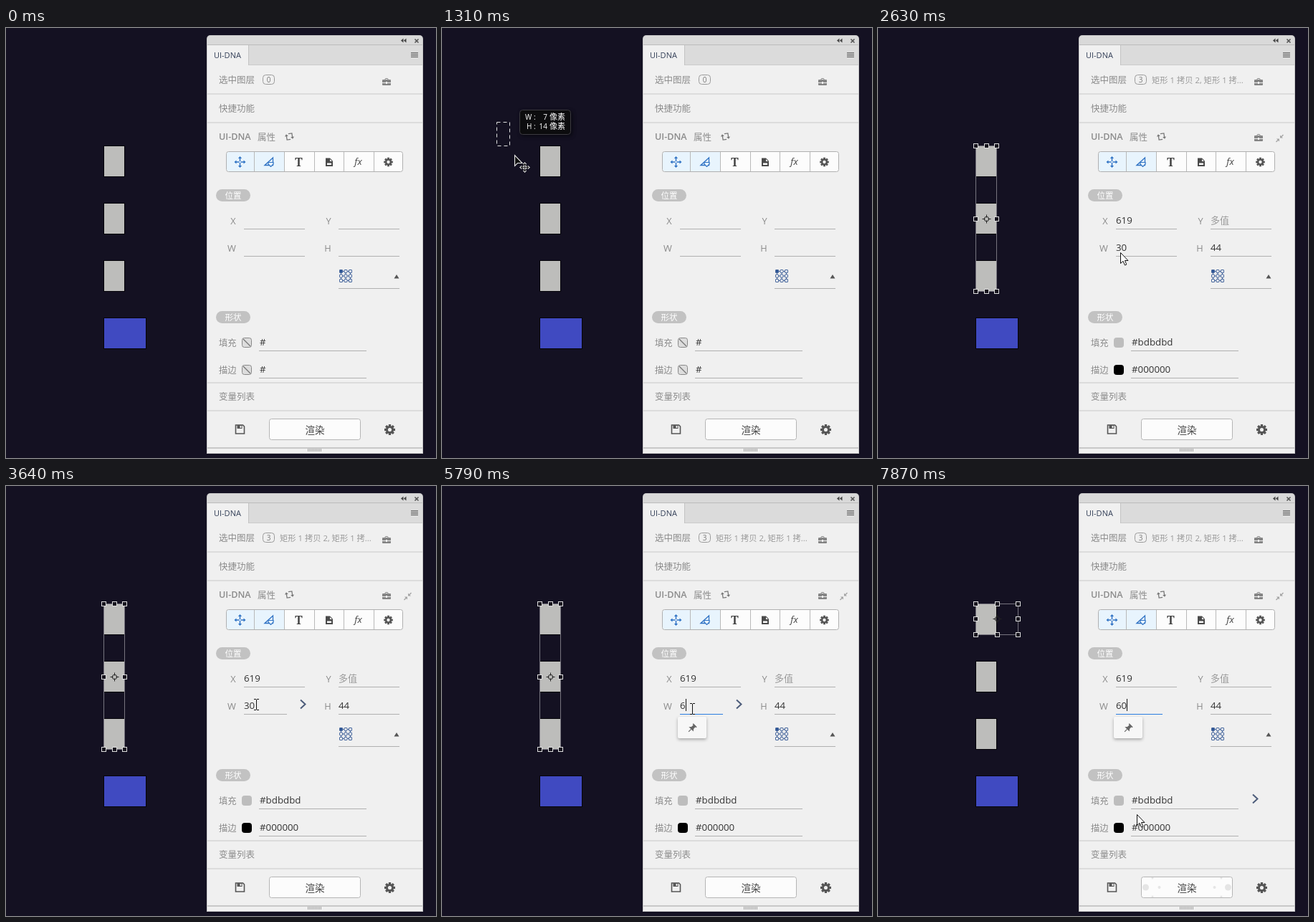
These frames come from a looping animation (600 px wide and 600 px high, 7990 ms). An HTML page with a canvas:

```html
<!DOCTYPE html>
<html lang="zh">
<head>
<meta charset="utf-8">
<title>Layer panel</title>
<style>
html, body { margin: 0; width: 100%; height: 100%; overflow: hidden; background: #141122; }
canvas { display: block; width: 600px; height: 600px; }
</style>
</head>
<body>
<canvas id="stage" width="600" height="600"></canvas>
<script>
const g = document.getElementById('stage').getContext('2d');
const LOOP = 7990;
const FONT = '"Open Sans", "Noto Sans CJK SC", "Noto Sans CJK", sans-serif';
const CJK = '"Noto Sans CJK SC", "Noto Sans CJK", sans-serif';
const GREY = '#8b8b8b', INK = '#333', DARK = '#555', BLUE = '#2f72c4', PANEL = '#f0f0f0';

// The screen refreshes in bursts: [first, last, steps].
const BURSTS = [[0, 0, 1], [100, 870, 8], [990, 1090, 2], [1310, 2080, 8], [2180, 2960, 8],
  [3070, 3640, 6], [4060, 4060, 1], [4370, 4370, 1], [4820, 5040, 3], [5260, 5590, 4],
  [5790, 6110, 4], [6670, 6670, 1], [7000, 7770, 8], [7870, 7870, 1]];
const TICKS = BURSTS.flatMap(([a, b, n]) =>
  Array.from({ length: n }, (_, i) => n > 1 ? a + (b - a) * i / (n - 1) : a));

const POINTER = [[100, 440, 505], [540, 240, 290], [870, 88, 139], [990, 79, 133], [1090, 76, 131],
  [1310, 101, 177], [1860, 230, 390], [2080, 230, 390], [2180, 238, 384], [2960, 413, 260],
  [3640, 349, 305], [4060, 350, 305], [4370, 351, 305], [5040, 351, 305], [5260, 345, 307],
  [5590, 317, 318], [5790, 349, 311], [6110, 370, 313], [7550, 370, 313], [7660, 369, 340],
  [7770, 366, 390], [7870, 361, 458]];
const MARQUEE = [[1310, 95, 165], [1860, 231, 391]];
const TIP_SIZE = [[1310, 7, 14], [1860, 155, 260]];
const TIP_POS = [[1310, 108, 114], [1860, 246, 342]];
const X_END = [[2740, 417], [2960, 392], [3070, 392], [3300, 417]];
const W_END = [[3180, 417], [3500, 392], [7770, 392], [7870, 397]];

function track(keys, t) {
  if (t <= keys[0][0]) return keys[0].slice(1);
  for (let i = 1; i < keys.length; i++) {
    const a = keys[i - 1], b = keys[i];
    if (t <= b[0]) {
      const p = (t - a[0]) / (b[0] - a[0]);
      return a.slice(1).map((v, k) => v + (b[k + 1] - v) * p);
    }
  }
  return keys[keys.length - 1].slice(1);
}

function rect(x, y, w, h, fill) { g.fillStyle = fill; g.fillRect(x, y, w, h); }
function round(x, y, w, h, r, fill, stroke) {
  g.beginPath(); g.roundRect(x, y, w, h, r);
  if (fill) { g.fillStyle = fill; g.fill(); }
  if (stroke) { g.strokeStyle = stroke; g.lineWidth = 1; g.stroke(); }
}
function poly(pts, fill, stroke, width = 1, close = true) {
  g.beginPath();
  pts.forEach(([x, y]) => g.lineTo(x, y));
  if (close) g.closePath();
  if (fill) { g.fillStyle = fill; g.fill(); }
  if (stroke) { g.strokeStyle = stroke; g.lineWidth = width; g.stroke(); }
}
function line(x1, y1, x2, y2, color, width = 1) { poly([[x1, y1], [x2, y2]], null, color, width, false); }
function dot(x, y, r, fill) { g.beginPath(); g.arc(x, y, r, 0, 7); g.fillStyle = fill; g.fill(); }
function text(s, x, y, size, color, align = 'left', weight = 400, family = FONT) {
  g.font = `${weight} ${size}px ${family}`;
  g.textAlign = align; g.fillStyle = color;
  g.fillText(s, x, y);
  return g.measureText(s).width;
}
function at(x, y, draw, turn = 0) { g.save(); g.translate(x, y); g.rotate(turn); draw(); g.restore(); }

// ---- icons ----
function gear(x, y, r, color, hole) {
  at(x, y, () => {
    for (let i = 0; i < 8; i++) { rect(-r * .22, -r, r * .44, r, color); g.rotate(Math.PI / 4); }
    dot(0, 0, r * .74, color);
    dot(0, 0, r * .34, hole);
  });
}
function briefcase(x, y) {
  round(x - 2, y - 4.5, 4, 3, 1, null, '#858585');
  round(x - 6, y - 3, 12, 8, 1, '#858585');
  rect(x - 6, y + 1, 12, 1, PANEL);
  rect(x - 1, y, 2, 3, PANEL);
}
function fourArrows(x, y, r, color, width) {
  at(x, y, () => {
    for (let i = 0; i < 4; i++) {
      line(0, -1, 0, -r + 2, color, width);
      poly([[0, -r], [2.6, -r + 3], [-2.6, -r + 3]], color);
      g.rotate(Math.PI / 2);
    }
  });
}
function refresh(x, y) {
  at(x, y, () => {
    for (let i = 0; i < 2; i++) {
      poly([[-1, -4], [4, -4], [4, 2]], null, '#777', 1.3, false);
      poly([[1.5, 1], [6.5, 1], [4, 4]], '#777');
      g.rotate(Math.PI);
    }
  }, -.15);
}
function collapse(x, y) {
  at(x, y, () => {
    for (let i = 0; i < 2; i++) {
      line(5, -5, 1.5, -1.5, '#a5a5a5', 1.4);
      poly([[.5, -4.5], [.5, -.5], [4.5, -.5]], '#a5a5a5');
      g.rotate(Math.PI);
    }
  });
}
function chevron(x, y) { poly([[x - 3.5, y - 6], [x + 3, y], [x - 3.5, y + 6]], null, '#4c5c7a', 2, false); }
function pin(x, y) {
  at(x, y, () => {
    rect(-3.5, -6, 7, 1.6, '#666');
    rect(-2, -5, 4, 5, '#666');
    poly([[-2, -1], [2, -1], [4.5, 2], [-4.5, 2]], '#666');
    line(0, 2, 0, 7, '#666', 1.2);
  }, Math.PI / 4);
}
function anchorGrid(x, y) {
  for (let i = 0; i < 9; i++) {
    const cx = x + i % 3 * 6.5, cy = y + Math.floor(i / 3) * 6.5;
    if (i % 3 < 2) line(cx + 4, cy + 2, cx + 6.5, cy + 2, '#47679d');
    if (i < 6) line(cx + 2, cy + 4, cx + 2, cy + 6.5, '#47679d');
    round(cx, cy, 4, 4, .5, i ? PANEL : '#2f5796', '#47679d');
  }
}
function saveIcon(x, y) {
  poly([[x - 6, y - 6], [x + 4, y - 6], [x + 6, y - 4], [x + 6, y + 6], [x - 6, y + 6]], null, DARK, 1.6);
  rect(x - 4, y - 6, 7, 5, DARK);
  rect(x, y - 5, 2, 3, PANEL);
}

// ---- left side ----
function shapes() {
  for (let i = 0; i < 3; i++) swatchRect(165 + 80 * i, 28, '#bdbdbb');
  swatchRect(405, 58, '#404ac1');
}
function swatchRect(y, w, fill) {
  rect(136, y - 1, w + 2, 44, '#050409');
  rect(137, y, w, 42, fill);
}
function transformBox(y, w, h) {
  const x = 136.5;
  g.strokeStyle = '#77757f'; g.lineWidth = 1;
  g.strokeRect(x, y, w, h);
  const mx = x + Math.round(w / 2), my = y + Math.floor(h / 2) + (h > 100 ? 1 : 0);
  for (const px of [x, mx, x + w]) for (const py of [y, my, y + h]) {
    if (px === mx && py === my) continue;
    rect(px - 3.5, py - 3.5, 7, 7, '#17141f');
    g.strokeStyle = '#dedede'; g.strokeRect(px - 2.5 - .5, py - 3, 6, 6);
  }
  g.beginPath(); g.arc(mx, my, 3.2, 0, 7);
  g.strokeStyle = '#222'; g.stroke();
  for (const [dx, dy] of [[1, 0], [-1, 0], [0, 1], [0, -1]])
    line(mx + dx * 2, my + dy * 2, mx + dx * 6, my + dy * 6, '#222');
}
function selection(t) {
  if (t >= 7110) {
    const k = Math.min(5, Math.floor((t - 7110 + 1) / 110));
    transformBox(164.5 + 80 * (2 - Math.floor(k / 2)), k % 2 ? 59 : 29, 43);
  } else if (t >= 1310) {
    const [mx, my] = track(MARQUEE, t);
    const n = mx > 137 ? [0, 1, 2].filter(i => my > 165 + 80 * i).length : 0;
    if (n) transformBox(164.5, 29, 80 * (n - 1) + 43);
  }
}
function marquee(t) {
  const [x, y] = track(MARQUEE, t).map(Math.round);
  g.setLineDash([5, 4]);
  g.strokeStyle = '#e2e2e2'; g.lineWidth = 1;
  g.strokeRect(76.5, 131.5, x - 77, y - 132);
  g.setLineDash([]);
}
function sizeTip(t) {
  const [w, h] = track(TIP_SIZE, t).map(Math.round), [x, y] = track(TIP_POS, t).map(Math.round);
  const wide = w > 99 || h > 99 ? 78 : 72, right = x + wide;
  g.save();
  g.shadowColor = 'rgba(0,0,0,.5)'; g.shadowBlur = 5; g.shadowOffsetX = g.shadowOffsetY = 2;
  round(x + .5, y + .5, wide - 1, 34, 4, '#0d0d0f', '#3c3b41');
  g.restore();
  [['W', w, 8, 14], ['H', h, 10, 27]].forEach(([name, v, dx, dy]) => {
    text(name, x + dx, y + dy, 10, '#fff');
    text(':', x + 20, y + dy, 10, '#fff');
    text(v, right - 33, y + dy, 10, '#fff', 'right');
    text('像素', right - 8, y + dy, 11, '#fff', 'right', 400, CJK);
  });
}

// ---- panel ----
function frame() {
  round(280, 10, 302, 584, [5, 5, 0, 0], '#c9c9c9');
  round(281, 11, 300, 13, [4, 4, 0, 0], '#d9d9d9');
  rect(281, 23, 300, 1, '#bcbcbc');
  rect(281, 24, 300, 28, '#dbdbdb');
  rect(281, 51, 300, 1, '#cbcbcb');
  rect(281, 52, 300, 541, PANEL);
  rect(281, 24, 57, 28, PANEL);
  rect(338, 24, 1, 28, '#c3c3c3');
  text('UI-DNA', 290, 42, 11, '#36425a');
  for (const x of [551, 555]) poly([[x, 17.5], [x + 3.5, 14.5], [x + 3.5, 20.5]], '#444');
  line(570.5, 15.5, 575.5, 20.5, '#555', 1.6);
  line(575.5, 15.5, 570.5, 20.5, '#555', 1.6);
  for (let i = 0; i < 4; i++) rect(565, 34 + 2 * i, 10, 1, '#666');
  for (const y of [91, 131, 494, 533]) rect(281, y, 300, 2, '#dcdcdc');
  rect(281, 585, 300, 2, '#c8c8c8');
  for (let x = 421; x < 440; x += 2) rect(x, 587, 1, 4, '#a5a5a5');
}
function header(t, hover) {
  const loaded = t >= 2290;
  text('选中图层', 297, 76.5, 12.5, GREY, 'left', 500, CJK);
  round(358.5, 65.5, 16, 13, 4, null, '#9a9a9a');
  text(loaded ? 3 : 0, 366.5, 76, 10, '#777', 'center');
  if (loaded) text('矩形 1 拷贝 2, 矩形 1 拷...', 382, 76.5, 11.3, '#999');
  briefcase(531, 75);
  text('快捷功能', 297, 116.5, 12.5, GREY, 'left', 400, CJK);
  text('UI-DNA', 297, 156, 12.6, GREY, 'left', 600);
  text('属性', 351, 156.5, 12.5, GREY, 'left', 500, CJK);
  refresh(395.5, 151.5);
  if (hover) { briefcase(531, 153); collapse(560.5, 154); }
}
function toolbar() {
  round(307.5, 172.5, 246, 28, 3, '#fcfcfc');
  round(308, 173, 80, 27, [3, 0, 0, 3], '#e8f4fd');
  for (const x of [346.5, 388.5, 430.5, 471.5, 513.5]) line(x, 173, x, 200, '#b9b9b9');
  round(307.5, 172.5, 246, 28, 3, null, '#b0b0b0');
  fourArrows(326.5, 187, 8, BLUE, 1.5);
  poly([[361, 191.5], [372.5, 181], [372.5, 191.5]], null, BLUE, 1.3);
  poly([[366, 187.5], [373, 187.5], [373, 190], [369.5, 193.5], [366, 190]], '#e8f4fd', BLUE, 1.2);
  text('T', 408.5, 193, 16, '#444', 'center', 700, '"Noto Serif", serif');
  poly([[446, 181.5], [452, 181.5], [456, 185.5], [456, 193], [446, 193]], '#4a4a4a');
  poly([[452, 183], [452, 186], [455, 186]], '#fcfcfc');
  rect(448, 188.5, 6, 2.5, '#fcfcfc');
  text('fx', 491.5, 191, 13, '#444', 'center', 'italic 400');
  gear(533.5, 187, 6.3, '#555', '#fcfcfc');
}
function pill(label, y) {
  round(293, y, 48, 17, 8.5, '#c2c2c2');
  text(label, 317, y + 13, 11.5, '#fff', 'center', 500, CJK);
}
function field(label, lx, x, end, y, value, color = INK) {
  text(label, lx, y - 6, 12.8, GREY, 'center');
  rect(x, y, end - x, 1, '#b0b0b0');
  if (value) text(value, x, y - 7.5, 13.3, color);
}
function paint(label, y, value, color) {
  text(label, 297, y + 5, 12.3, GREY, 'left', 400, CJK);
  round(329.5, y - 6.5, 13, 13, 3, color || '#ddd', color || '#888');
  if (!color) line(331, y - 5, 341, y + 5, '#777', 1.2);
  text(value, 354, y + 4, 13.3, INK);
  rect(353, y + 11, 150, 1, '#b0b0b0');
}
function widthInput(t, end) {
  const focus = t >= 4820, typed = t >= 5890 ? '60' : t >= 5790 ? '6' : '30';
  field('W', 315, 332, end, 318, '');
  g.font = `13.3px ${FONT}`;
  const right = 332 + g.measureText(typed).width;
  const dragging = t >= 5260 && t < 5790;
  const left = dragging ? Math.max(332, track(POINTER, t)[0]) : right;
  text(typed, 332, 310.5, 13.3, INK);
  if (dragging && left < right) {
    g.save();
    g.beginPath(); g.rect(left, 298, right - left, 16); g.clip();
    rect(left, 298, right - left, 16, '#3390ff');
    text(typed, 332, 310.5, 13.3, '#fff');
    g.restore();
  }
  if (!focus) return;
  rect(332, 318, end - 332, 1, '#2b7de0');
  const caret = !dragging && !(t >= 6670 && t < 7000);
  if (caret) rect(Math.round(right), 297, 1, 17, '#111');
  g.save();
  g.globalAlpha = Math.min(1, .4 + (t - 4820) / 360);
  g.shadowColor = 'rgba(0,0,0,.3)'; g.shadowBlur = 4; g.shadowOffsetY = 2;
  round(329, 322, 40, 30, 2, '#f7f7f7');
  g.shadowColor = 'transparent';
  pin(349, 338);
  g.restore();
}
function properties(t) {
  const loaded = t >= 2290;
  pill('位置', 225);
  field('X', 317, 332, track(X_END, t)[0], 280, loaded && '619');
  field('Y', 450, 464, 549, 280);
  if (loaded) text('多值', 464, 273, 13, '#999', 'left', 400, CJK);
  if (loaded) widthInput(t, track(W_END, t)[0]);
  else field('W', 315, 332, 417, 318);
  field('H', 449, 464, 549, 318, loaded && '44');
  if (t >= 2850 && t < 3170) chevron(414.5, 266.5);
  if (t >= 3390 && t < 7760) chevron(414.5, 304.5);
  if (t >= 7860) chevron(526.5, 436.5);
  anchorGrid(465.5, 337.5);
  poly([[541.5, 349.5], [545, 344], [548.5, 349.5]], '#555');
  rect(464, 363, 85, 1, '#b0b0b0');
  pill('形状', 395);
  paint('填充', 439, loaded ? '#bdbdbd' : '#', loaded && '#bdbdbd');
  paint('描边', 477, loaded ? '#000000' : '#', loaded && '#000');
}
function footer(t) {
  text('变量列表', 297, 519, 12.5, GREY, 'left', 400, CJK);
  saveIcon(326.5, 560);
  gear(535.5, 560.5, 7.5, '#555', PANEL);
  round(367.5, 545.5, 127, 29, 3, '#fcfcfc');
  if (t >= 7110) burst((t - 7330) / 540);
  round(367.5, 545.5, 127, 29, 3, null, '#b5b5b5');
  text('渲染', 431, 566, 13.5, '#444', 'center', 400, CJK);
}
// Dots fly outwards from the button's label and shrink.
function burst(p) {
  g.save();
  g.beginPath(); g.rect(368, 546, 126, 28); g.clip();
  for (const side of [-1, 1]) {
    const drop = (off, far, y, r, end) => {
      dot(431 + side * (off + (far - off) * p), 560 + y, Math.max(.5, r + (end - r) * p), '#e5e5e5');
    };
    drop(19, 57.5, 0, 8, 4.5);
    drop(8, 38.5, 0, 6, 2);
    for (const v of [-1, 1]) drop(12, 48, v * (5 + 8 * p), 4.5, 1.5);
  }
  g.restore();
}

// ---- pointer ----
function pointer(t, x, y) {
  x = Math.round(x); y = Math.round(y);
  if (x < 281) {
    poly([[x + .5, y + .5], [x + .5, y + 15.5], [x + 4.5, y + 11.5], [x + 11, y + 11.5]], '#111', '#e8e8e8', 1.1);
    fourArrows(x + 14.5, y + 17.5, 7.5, '#eee', 3.5);
    fourArrows(x + 14.5, y + 17.5, 6, '#222', 1.2);
  } else if (t >= 3170 && t < 7650 || x < 332 && t > 5000 && t < 5790) {
    rect(x, y - 7, 1, 14, '#111');
    for (const yy of [y - 8, y + 7]) { rect(x - 3, yy, 3, 1, '#111'); rect(x + 1, yy, 3, 1, '#111'); }
  } else {
    poly([[0, 0], [0, 15], [3.5, 11.8], [6, 17.5], [8.3, 16.5], [6, 11], [10.5, 11]]
      .map(([a, b]) => [x + a + .5, y + b + .5]), '#fff', '#111');
  }
}

function draw(time) {
  const t = TICKS.filter(k => k <= time + .01).pop();
  const [x, y] = track(POINTER, t);
  const shown = t >= 100, hover = shown && x > 281 && y > 133 && y < 494;
  rect(0, 0, 600, 600, '#141122');
  shapes();
  selection(t);
  frame();
  header(t, hover);
  toolbar();
  properties(t);
  footer(t);
  if (t >= 1310 && t < 2070) { marquee(t); sizeTip(t); }
  if (shown) pointer(t, x, y);
}

const start = performance.now();
function loop() {
  draw((performance.now() - start) % LOOP);
  requestAnimationFrame(loop);
}
loop();
</script>
</body>
</html>
```
